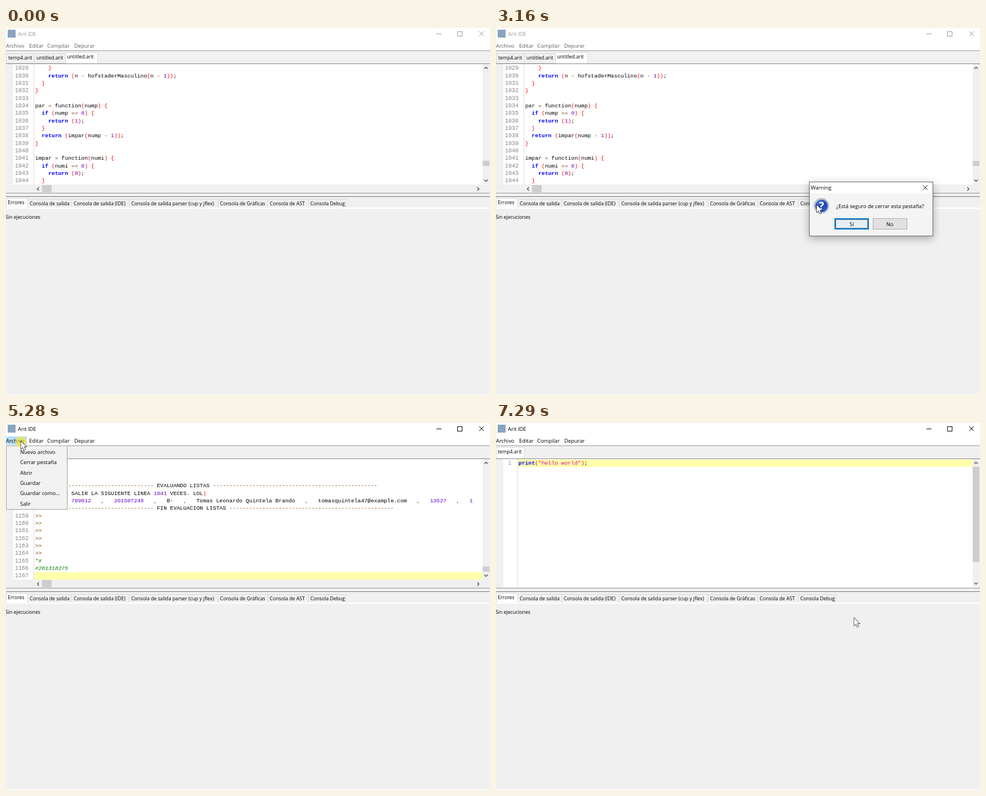
An HTML page with a canvas for the animation above (8390 ms loop, 858 by 652 pixels).

```html
<!DOCTYPE html>
<html lang="es">
<head>
<meta charset="utf-8">
<title>Arit IDE</title>
<style>
html, body { margin: 0; width: 858px; height: 652px; overflow: hidden; background: #f0f0f0; }
canvas { display: block; }
</style>
</head>
<body>
<canvas id="stage" width="858" height="652"></canvas>
<script>
const c = document.getElementById('stage').getContext('2d');
const LOOP = 8390, STEP = 77;
const MENU_FONT = '9.4px "Open Sans", sans-serif';
const TAB_FONT = '8.7px "Open Sans", sans-serif';
const MONO = '"Liberation Mono", monospace';
const CHAR = 5.833, LINE = 13.333;

// Cursor path: time, x, y
const PATH = [
  [140, 648, 549], [280, 349, 284], [500, 349, 284], [1130, 26.5, 32.5],
  [1500, 26.5, 32.5], [2150, 33, 66], [2740, 33, 66], [3080, 568.5, 314],
  [3530, 568.5, 314], [3770, 613.5, 343], [4200, 613.5, 343], [4400, 120, 115],
  [4620, 120, 115], [5130, 26.5, 32.5], [5480, 26.5, 32.5], [6060, 33, 64],
  [6450, 33, 64], [6530, 538.5, 305], [6620, 538.5, 305], [6900, 635, 346.5]
];
const CLICKS = [[1300, 1530], [2310, 2390], [3800, 3950], [5200, 5360], [6200, 6280], [7060, 7210]];
const MENUS = [[1370, 2310], [5200, 6200]];
const DIALOGS = [[2390, 3950], [6320, 7210]];

const dashes = n => '-'.repeat(n);
const prompts = n => Array(n).fill('>>');
const record = ['>> 0', '789012', '201507248', 'B-', 'Tomas Leonardo Quintela Brando',
  'tomasquintela47@example.com', '13527', '1'].join('   ,   ');

const FILES = [
  { until: 4040, first: 1029, tabs: ['temp4.arit', 'untitled.arit', 'untitled.arit'],
    edges: [0, 50, 105, 162], gutter: 49, thumb: [236, 9], current: -1,
    lines: ['    }', '    return (n - hofstaderMasculino(n - 1));', '  }', '}', '',
      'par = function(nump) {', '  if (nump == 0) {', '    return (1);', '  }',
      '  return (impar(nump - 1));', '}', '',
      'impar = function(numi) {', '  if (numi == 0) {', '    return (0);', '  }'] },
  { until: 7290, first: 1152, tabs: ['temp4.arit', 'untitled.arit'],
    edges: [0, 49, 105], gutter: 49, thumb: [255, 9], current: 15,
    lines: [...prompts(3), `>>${dashes(34)} EVALUANDO LISTAS ${dashes(50)}`,
      '(TIENE QUE SALIR LA SIGUIENTE LINEA 1841 VECES. LOL)', record,
      `>>${dashes(34)} FIN EVALUACION LISTAS ${dashes(50)}`,
      ...prompts(6), '*#', '#201318275', ''] },
  { until: LOOP, first: 1, tabs: ['temp4.arit'], edges: [0, 50], gutter: 37.5,
    thumb: [78, 169], current: 0, lines: ['print("hello world");'] }
];

const TOKENS = [
  [/^#.*/, '#008000', 'italic '],
  [/^"[^"]*"/, '#dc009c', ''],
  [/^(return|if|print)\b/, '#0000ff', 'bold '],
  [/^[A-Za-z]\w*/, '#000', ''],
  [/^\d+/, '#6400c8', ''],
  [/^[(){}]/, '#ff0000', ''],
  [/^[-=>*,]+/, '#804000', ''],
  [/^./, '#000', '']
];

const within = (spans, t) => spans.find(([a, b]) => t >= a && t < b);

function box(x, y, w, h, fill, stroke) {
  if (fill) { c.fillStyle = fill; c.fillRect(x, y, w, h); }
  if (stroke) { c.strokeStyle = stroke; c.lineWidth = 1; c.strokeRect(x + .5, y + .5, w - 1, h - 1); }
}

function text(s, x, y, color = '#000', font = MENU_FONT, align = 'left') {
  c.font = font; c.fillStyle = color; c.textAlign = align;
  c.fillText(s, x, y);
}

function line(points, color, width = 1, close) {
  c.beginPath();
  points.forEach(([x, y]) => c.lineTo(x, y));
  if (close) c.closePath();
  c.strokeStyle = color; c.lineWidth = width;
  c.stroke();
}

function cross(x, y, r, color) {
  line([[x - r, y - r], [x + r, y + r]], color);
  line([[x - r, y + r], [x + r, y - r]], color);
}

function chevron(x, y, dx, dy) {
  const tip = [x + dx * 1.5, y + dy * 1.5];
  const wing = s => [x - dx * 1.5 + s * dy * 3, y - dy * 1.5 + s * dx * 3];
  line([wing(-1), tip, wing(1)], '#505050', 1.4);
}

function codeLine(s, x, y) {
  for (let col = 0; col < s.length;) {
    const rest = s.slice(col);
    const [rule, color, style] = TOKENS.find(([r]) => r.test(rest));
    const word = rest.match(rule)[0];
    text(word, x + col * CHAR, y, color, `${style}9.72px ${MONO}`);
    col += word.length;
  }
}

function tabs(names, edges, active, top, bottom) {
  names.forEach((name, i) => {
    const on = i === active, x = edges[i], w = edges[i + 1] - x;
    box(x, top + (on ? 0 : 2), w + 1, bottom - top - (on ? 0 : 2), on ? '#fff' : '#f0f0f0', '#d9d9d9');
    if (on) box(x + 1, bottom - 1, w - 1, 1, '#fff');
    text(name, x + (on ? 3.2 : 4), top + (on ? 11 : 12.5), '#000', TAB_FONT);
  });
}

function header(active) {
  box(0, 0, 858, 40, '#fff');
  box(3, 3, 14, 14, '#8aa4bd');
  const ink = active ? '#000' : '#999', menuInk = active ? '#000' : '#5c5c5c';
  text('Arit IDE', 21, 14, ink);
  box(763, 10, 9, 1, ink);
  box(800, 6, 9, 9, null, ink);
  cross(843, 10, 4.2, ink);
  [['Archivo', 0], ['Editar', 41], ['Compilar', 73], ['Depurar', 121]]
    .forEach(([s, x]) => text(s, x, 35, menuInk));
}

function editor(file) {
  const scrollX = file.gutter > 40, bottom = scrollX ? 278 : 292;
  box(0, 40, 858, 1, '#8c8c8c');
  box(0, 41, 858, 1, '#fff');
  tabs(file.tabs, file.edges, file.tabs.length - 1, 43, 63);
  box(0, 63, 858, 1, '#868686');
  box(0, 64, 858, bottom - 64, '#fff');
  box(0, 64, 13, bottom - 64, '#f0f0f0');
  box(file.gutter, 64, 1, bottom - 64, '#dcdcdc');
  if (file.current >= 0)
    box(file.gutter + 1, 65 + file.current * LINE, 843.5 - file.gutter, 13, '#ffffaa');
  file.lines.forEach((s, i) => {
    const y = 74.2 + i * LINE;
    text(file.first + i, scrollX ? 40 : 27.5, y, scrollX ? '#858585' : '#c08888', `10px ${MONO}`, 'right');
    codeLine(s, scrollX ? 51.7 : 39.8, y);
  });
  box(845, 64, 13, bottom - 64, '#f0f0f0');
  box(845, file.thumb[0], 12, file.thumb[1], '#cdcdcd');
  chevron(851, 71, 0, -1);
  chevron(851, bottom - 7, 0, 1);
  if (scrollX) {
    box(64, 279, 17, 13, '#cdcdcd');
    chevron(57, 286, -1, 0);
    chevron(837, 286, 1, 0);
  }
}

function consolePane() {
  box(0, 293, 858, 1, '#8c8c8c');
  box(0, 294, 858, 1, '#fff');
  box(0, 299, 858, 1, '#777');
  tabs(['Errores', 'Consola de salida', 'Consola de salida (IDE)', 'Consola de salida parser (cup y jflex)',
    'Consola de Gràficas', 'Consola de AST', 'Consola Debug'],
    [0, 38, 116, 218, 375.5, 463.5, 535.5, 602], 0, 302, 320);
  box(0, 319, 858, 2, '#fff');
  text('Sin ejecuciones', -1, 338.5, '#000', TAB_FONT);
  box(0, 651, 858, 1, '#fff');
}

function menu(cursorY) {
  box(0, 24, 37, 15, '#b5dcfb');
  text('Archivo', 0, 35);
  box(0, 40, 109, 114, '#f2f2f2', '#a0a0a0');
  ['Nuevo archivo', 'Cerrar pestaña', 'Abrir', 'Guardar', 'Guardar como...', 'Salir'].forEach((s, i) => {
    const top = 42 + i * 18.4;
    if (cursorY >= top && cursorY < top + 18.4) box(2, top, 105, 18, '#91c9f7');
    text(s, 25, top + 12.8);
  });
}

function dialog(age) {
  c.save();
  c.globalAlpha = age < 70 ? .6 : 1;
  c.save();
  c.shadowColor = 'rgba(0,0,0,.3)'; c.shadowBlur = 14; c.shadowOffsetY = 4;
  box(555, 273, 220, 97, '#f4f4f4');
  c.restore();
  box(555, 273, 220, 97, '#f4f4f4', '#666');
  box(556, 274, 218, 20, '#fff');
  text('Warning', 558, 287);
  cross(761, 283.5, 4, '#000');

  const disc = (r, fill) => {
    c.beginPath(); c.arc(577, 316, r, 0, 7); c.fillStyle = fill; c.fill();
  };
  const blue = c.createLinearGradient(568, 305, 585, 328);
  blue.addColorStop(0, '#5a86e0');
  blue.addColorStop(.5, '#1f49b4');
  blue.addColorStop(1, '#2f62d0');
  disc(13.5, '#8d929c');
  disc(12.6, '#e4e7ee');
  disc(11.3, blue);
  text('?', 577, 323, '#fff', 'bold 19px "Open Sans", sans-serif', 'center');
  text('¿Está seguro de cerrar esta pestaña?', 603, 320, '#000', '9.2px "Open Sans", sans-serif');

  const pulse = Math.round(4 * Math.cos(age / 250));
  box(600, 338, 61, 20, `rgb(${225 - pulse},238,${247 + pulse})`);
  c.strokeStyle = '#0078d7'; c.lineWidth = 2; c.strokeRect(601, 339, 59, 18);
  c.setLineDash([1, 1]);
  box(602, 340, 57, 16, null, '#222');
  c.setLineDash([]);
  text('Sí', 630.5, 351.5, '#000', MENU_FONT, 'center');
  box(668, 338, 61, 20, '#e1e1e1', '#adadad');
  text('No', 698, 351.5, '#000', MENU_FONT, 'center');
  c.restore();
}

function cursorAt(t) {
  const i = PATH.findIndex(p => p[0] > t);
  if (i < 0) return PATH[PATH.length - 1].slice(1);
  if (i === 0) return PATH[0].slice(1);
  const [t0, x0, y0] = PATH[i - 1], [t1, x1, y1] = PATH[i];
  const u = (t - t0) / (t1 - t0), k = u * u * (3 - 2 * u);
  return [x0 + (x1 - x0) * k, y0 + (y1 - y0) * k];
}

function cursor(x, y, pressed) {
  if (pressed) {
    c.beginPath(); c.arc(x, y + 1, 10, 0, 7);
    c.fillStyle = 'rgba(255,235,40,.6)'; c.fill();
  }
  const shape = [[0, 0], [0, 13.5], [3.2, 10.6], [5.5, 15.8], [7.6, 14.9], [5.4, 9.8], [9.5, 9.6]]
    .map(([a, b]) => [x + a, y + b]);
  line(shape, '#000', 1.2, true);
  c.fillStyle = '#fff'; c.fill();
}

function draw(t) {
  const [x, y] = cursorAt(Math.floor(t / STEP) * STEP);
  const openDialog = within(DIALOGS, t);
  box(0, 0, 858, 652, '#f0f0f0');
  header(t >= 1300 && !openDialog);
  editor(FILES.find(f => t < f.until));
  consolePane();
  if (within(MENUS, t)) menu(y);
  if (openDialog) dialog(t - openDialog[0]);
  if (t >= 130) cursor(x, y, within(CLICKS, t));
}

const start = performance.now();
function tick() {
  draw((performance.now() - start) % LOOP);
  requestAnimationFrame(tick);
}
tick();
</script>
</body>
</html>
```
